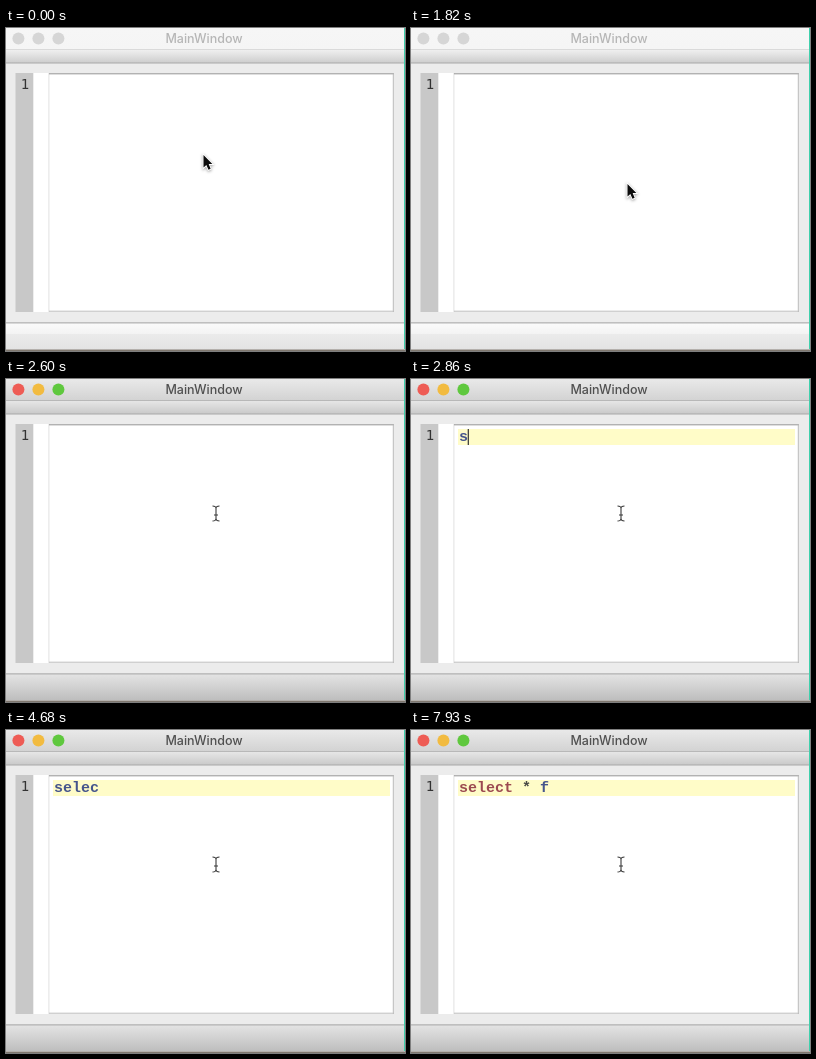
An HTML page with a canvas for the animation above (8 s loop, 399 by 323 pixels).

```html
<!DOCTYPE html>
<html lang="en">
<head>
<meta charset="utf-8">
<title>Code editor</title>
<style>
  html, body { margin: 0; width: 100%; height: 100%; overflow: hidden; }
  canvas { display: block; }
</style>
</head>
<body>
<canvas id="stage" width="399" height="323"></canvas>
<script>
const ctx = document.getElementById('stage').getContext('2d');
const LOOP = 8000;
const ACTIVATE = 1950;
const CHAR = 9;
const TEXT_X = 48;

// Each track is a list of [start time, value].
const pointer = [
  [0, [197.5, 127]], [260, [200, 136]], [390, [213, 174]], [520, [235, 232]],
  [650, [257, 290]], [780, null], [1560, [228, 285]], [1690, [219, 206]],
  [1820, [216.5, 156]], [1950, [214, 156]], [2210, [212, 145]], [2340, [210, 134.5]]
];
const typed = [
  [0, ''], [2860, 's'], [3640, 'se'], [3900, 'sel'], [4160, 'sele'],
  [4680, 'selec'], [4940, 'select'], [5720, 'select '], [6630, 'select *'],
  [6890, 'select * '], [7410, 'select * f']
];
const caret = [
  [0, false], [1950, true], [2600, false], [2860, true], [3120, false],
  [3900, true], [4160, false], [5200, true], [5850, false], [6370, true],
  [6630, false], [6890, true], [7020, false], [7410, true], [7540, false],
  [7800, true], [7930, false]
];

function at(track, t) {
  let value = track[0][1];
  for (const [start, v] of track) if (t >= start) value = v;
  return value;
}

function rect(x, y, w, h, color) {
  ctx.fillStyle = color;
  ctx.fillRect(x, y, w, h);
}

function shade(y, h, ...colors) {
  const g = ctx.createLinearGradient(0, y, 0, y + h);
  colors.forEach((c, i) => g.addColorStop(i / (colors.length - 1), c));
  rect(0, y, 399, h, g);
}

function label(text, x, y, font, color, align = 'left') {
  ctx.font = font;
  ctx.fillStyle = color;
  ctx.textAlign = align;
  ctx.fillText(text, x, y);
}

function drawTitleBar(active) {
  if (active) shade(0, 21, '#e9e9e9', '#d3d3d3');
  else shade(0, 21, '#f6f6f6', '#f5f5f5');
  rect(0, 21, 399, 1, active ? '#b8b8b8' : '#dadada');
  shade(22, 13, active ? '#e6e6e6' : '#efefef', active ? '#c9c9c9' : '#cdcdcd');
  rect(0, 34.5, 399, 1, '#a9a9a9');

  const lights = active ? ['#ee5c55', '#f2bb40', '#5fc83e'] : Array(3).fill('#d6d6d6');
  lights.forEach((color, i) => {
    ctx.fillStyle = color;
    ctx.beginPath();
    ctx.arc(12.4 + 20 * i, 10.5, 6, 0, 7);
    ctx.fill();
  });
  label('MainWindow', 198, 15.3, '500 12.5px Inter, sans-serif', active ? '#505050' : '#b6b6b6', 'center');
}

function drawStatusBar(active) {
  if (active) {
    shade(295, 26, '#e4e4e4', '#bebebe');
  } else {
    shade(295, 11, '#fbfbfb', '#f3f3f3');
    shade(306, 15, '#ebebeb', '#e3e3e3');
  }
  rect(0, 294.4, 399, 1, '#a3a3a3');
}

function drawEditor(text, showCaret) {
  rect(27, 45, 361, 239, '#ffffff');
  rect(9.5, 45, 17.8, 239, '#c8c8c8');
  rect(42.4, 45, 1, 239, '#e2e2e2');
  rect(43, 45.3, 345, 1, '#929292');
  rect(386.8, 45, 1, 239, '#b9b9b9');
  rect(43, 282.7, 345, 1, '#bcbcbc');
  label('1', 14.8, 61, '14px "DejaVu Sans Mono", monospace', '#333333');

  if (text) rect(47, 50, 337, 16, '#fffcc8');
  const font = 'bold 15px "Liberation Mono", monospace';
  let x = TEXT_X;
  for (const word of text.split(' ')) {
    const color = word === 'select' ? '#9c4a50' : word === '*' ? '#4a4a46' : '#46558c';
    label(word, x, 62, font, color);
    x += (word.length + 1) * CHAR;
  }
  if (showCaret) rect(TEXT_X + text.length * CHAR - 0.3, 50, 1.2, 16, '#333333');
}

function drawArrow() {
  const shape = new Path2D('M0 0V14L3.3 11L5.7 16.5L8.2 15.4L5.9 10.1H10.2Z');
  ctx.save();
  ctx.scale(0.87, 0.9);
  ctx.save();
  ctx.shadowColor = 'rgba(0,0,0,.4)';
  ctx.shadowBlur = 3;
  ctx.shadowOffsetY = 1;
  ctx.lineWidth = 2;
  ctx.strokeStyle = '#ffffff';
  ctx.stroke(shape);
  ctx.restore();
  ctx.fillStyle = '#0c0c0c';
  ctx.fill(shape);
  ctx.restore();
}

function drawBeam() {
  ctx.strokeStyle = '#3a3a3a';
  ctx.lineWidth = 1.1;
  ctx.stroke(new Path2D('M-3.5 -7.5Q0 -7.5 0 -5Q0 -7.5 3.5 -7.5M0 -5V5' +
    'M-3.5 7.5Q0 7.5 0 5Q0 7.5 3.5 7.5M-2 1.5H2'));
}

function draw(t) {
  const active = t >= ACTIVATE;
  rect(0, 0, 399, 323, '#ececec');
  drawTitleBar(active);
  drawEditor(at(typed, t), at(caret, t));
  drawStatusBar(active);
  rect(0, 321.5, 399, 1.5, '#7f776e');
  rect(398, 0, 1, 321, '#3fd0ac');

  const spot = at(pointer, t);
  if (!spot) return;
  ctx.save();
  ctx.translate(...spot);
  if (active) drawBeam();
  else drawArrow();
  ctx.restore();
}

const start = performance.now();
function tick() {
  draw((performance.now() - start) % LOOP);
  requestAnimationFrame(tick);
}
tick();
</script>
</body>
</html>
```
